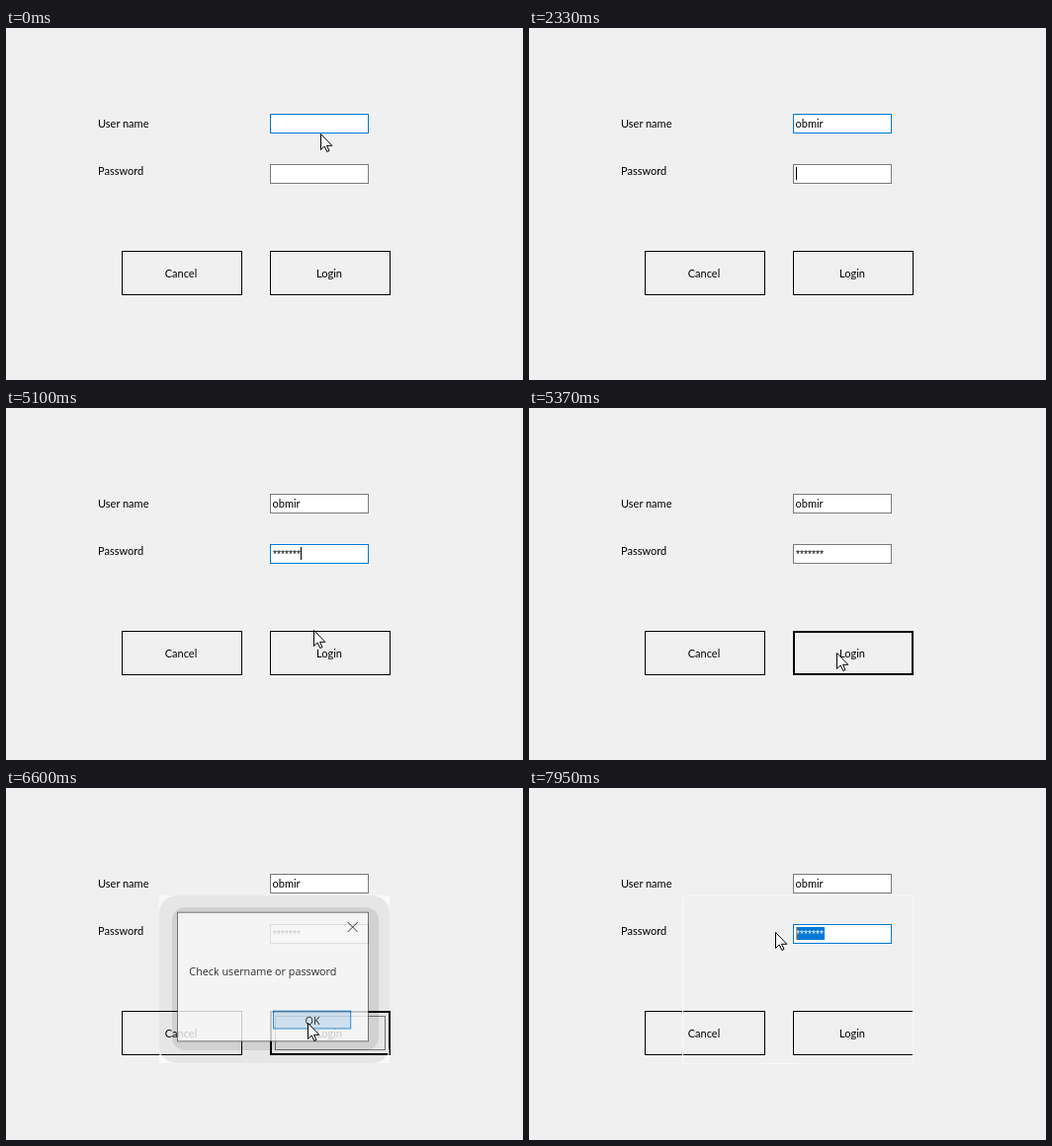
Write an HTML page that moves like this. It is 523 px wide and 357 px high and loops after 8 s.

```html
<!DOCTYPE html>
<html lang="en">
<head>
<meta charset="utf-8">
<title>Login form</title>
<style>
  html, body { margin: 0; width: 100%; height: 100%; overflow: hidden; background: #f0f0f0; }
  svg { display: block; width: 100vw; height: 100vh; }
  text { font: 11px Lato, sans-serif; white-space: pre; }
  #stars { font: 10.3px "Liberation Sans", Arial, sans-serif; }
  #dialog text { font: 10.9px "Open Sans", sans-serif; }
  .mid { text-anchor: middle; }
  .line { fill: none; stroke: #000; }
</style>
</head>
<body>
<svg viewBox="0 0 523 357">
  <rect width="523" height="357" fill="#f0f0f0"/>
  <text x="93" y="101">User name</text>
  <text x="93" y="149">Password</text>

  <rect id="userBox" x="267.5" y="87.5" width="99" height="19" fill="#fff"/>
  <rect id="passBox" x="267.5" y="138.5" width="99" height="19" fill="#fff"/>
  <rect id="selection" y="141" height="13" fill="#0078d7"/>
  <text id="user" x="269.5" y="101"></text>
  <text id="stars" x="270" y="152"><tspan id="plain"></tspan><tspan id="picked" fill="#fff"></tspan></text>
  <rect id="caret" width="1" height="13"/>

  <rect class="line" x="117.5" y="226.5" width="121" height="44"/>
  <text class="mid" x="177" y="253">Cancel</text>
  <rect class="line" x="267.5" y="226.5" width="121" height="44"/>
  <rect id="thick" class="line" x="268" y="227" width="120" height="43" stroke-width="2"/>
  <rect id="focus" class="line" x="272.5" y="231.5" width="111" height="34" style="stroke:#777"/>
  <text class="mid" x="327" y="253">Login</text>

  <rect id="ghost" x="155.5" y="109.5" width="233" height="170" fill="none" stroke="#f8f8f8"/>
  <g id="shadow">
    <path fill="#fff" fill-opacity=".6" fill-rule="evenodd"
      d="M155 109h233v170H155ZM175 109h193q20 0 20 20v130q0 20-20 20H175q-20 0-20-20V129q0-20 20-20Z"/>
    <rect x="155" y="109" width="233" height="170" rx="18" fill-opacity=".045"/>
    <rect x="168" y="121" width="209" height="145" rx="13" fill-opacity=".09"/>
  </g>
  <g id="dialog">
    <rect x="172.5" y="125.5" width="195" height="132" fill="#fff" stroke="#555"/>
    <path class="line" d="M346.5 135.5l10 10m0-10l-10 10"/>
    <text x="184.5" y="190">Check username or password</text>
    <rect id="ok" x="270.5" y="226.5" width="79" height="18"/>
    <text class="mid" x="310.5" y="240">OK</text>
  </g>

  <path id="arrow" d="M.5.5V16.5L4.2 13l2.6 5.5 2.2-1-2.5-5.2H11.8Z" fill="#fff" stroke="#000"/>
  <path id="beam" class="line" d="M-3-7.5h2.5M.5-7.5H3.5M0-7V7M-3 7.5h2.5M.5 7.5H3.5"/>
</svg>
<script>
const LOOP = 8000, BLUE = '#0078d7', GRAY = '#7a7a7a', NAME = 'obmir';
const $ = id => document.getElementById(id);
const set = (id, attrs) => { for (const k in attrs) $(id).setAttribute(k, attrs[k]); };
const show = (id, on) => set(id, { visibility: on ? 'visible' : 'hidden' });
const put = (id, s) => { if ($(id).textContent !== s) $(id).textContent = s; };

// Each track is a list of [start, ...values]; the latest started entry holds.
const at = (track, t) => track.findLast(e => e[0] <= t);
const count = (times, t) => times.filter(s => s <= t).length;

const nameKeys = [1230, 1530, 1660, 1800, 2080];
const starKeys = [2750, 3180, 3450, 3600, 3720, 3870, 3870];
const userEdge = [[0, BLUE], [2480, '#3d79a8'], [2610, GRAY]];
const passEdge = [[0, GRAY], [2480, '#3d79a8'], [2610, BLUE], [5370, GRAY], [7530, BLUE]];
const carets = [[0, ''], [560, 'user'], [1110, ''], [1230, 'user'], [2330, 'pass'],
  [4400, ''], [4950, 'pass'], [5370, ''], [7800, 'end']];
const picks = [[0, 0], [7680, 4], [7800, 7]];
const fades = [[0, 0, 1], [5520, .5, .98], [5640, .88, 1], [5790, 1, 1],
  [6480, .92, 1], [6600, .78, .99], [6750, 0, 1]];
const okLooks = [[0, '#e1e1e1', 2], [5910, '#e5f1fb', 1], [6210, '#cce4f7', 1]];
const pointer = [[0, 'arrow', 318, 107], [840, 'arrow', 319, 107], [1230, ''],
  [4800, 'arrow', 318, 112], [4950, 'arrow', 315, 168], [5100, 'arrow', 311, 225],
  [5250, 'arrow', 311, 242], [5370, 'arrow', 311, 248], [5910, 'arrow', 308, 243],
  [6060, 'arrow', 305, 238], [6870, 'arrow', 305, 230], [7020, 'arrow', 306, 210],
  [7140, 'arrow', 306, 188], [7290, 'arrow', 305, 170], [7410, 'arrow', 304, 160],
  [7530, 'beam', 302.5, 148], [7680, 'beam', 283.5, 148], [7800, 'beam', 246.5, 143],
  [7950, 'arrow', 249, 146]];

function draw(t) {
  put('user', NAME.slice(0, count(nameKeys, t)));
  const stars = count(starKeys, t), picked = at(picks, t)[1];
  put('plain', '*'.repeat(stars - picked));
  put('picked', '*'.repeat(picked));
  set('selection', { x: 270 + 4 * (7 - picked), width: picked ? 4 * picked + 1 : 0 });
  set('userBox', { stroke: at(userEdge, t)[1] });
  set('passBox', { stroke: at(passEdge, t)[1] });

  const caret = at(carets, t)[1];
  show('caret', caret);
  const x = caret === 'user' ? Math.round(269.5 + $('user').getComputedTextLength())
    : caret === 'pass' ? 270 + 4 * stars : 270;
  set('caret', { x, y: caret === 'user' ? 90 : 141, fill: caret === 'end' ? '#ff8728' : '#000' });

  show('thick', t >= 5370 && t < 7530);
  show('focus', t >= 6480 && t < 7530);
  show('ghost', t >= 6750);

  const [, alpha, size] = at(fades, t);
  set('shadow', { opacity: Math.min(1, alpha * 1.3) });
  set('dialog', { opacity: alpha, transform: `translate(270 191.5) scale(${size}) translate(-270 -191.5)` });
  const [, fill, line] = at(okLooks, t);
  set('ok', { fill, stroke: BLUE, 'stroke-width': line });

  const [, kind, px, py] = at(pointer, t);
  for (const id of ['arrow', 'beam']) {
    show(id, id === kind);
    if (id === kind) set(id, { transform: `translate(${px} ${py})` });
  }
}

const start = performance.now();
function tick() {
  draw((performance.now() - start) % LOOP);
  requestAnimationFrame(tick);
}
tick();
</script>
</body>
</html>
```
